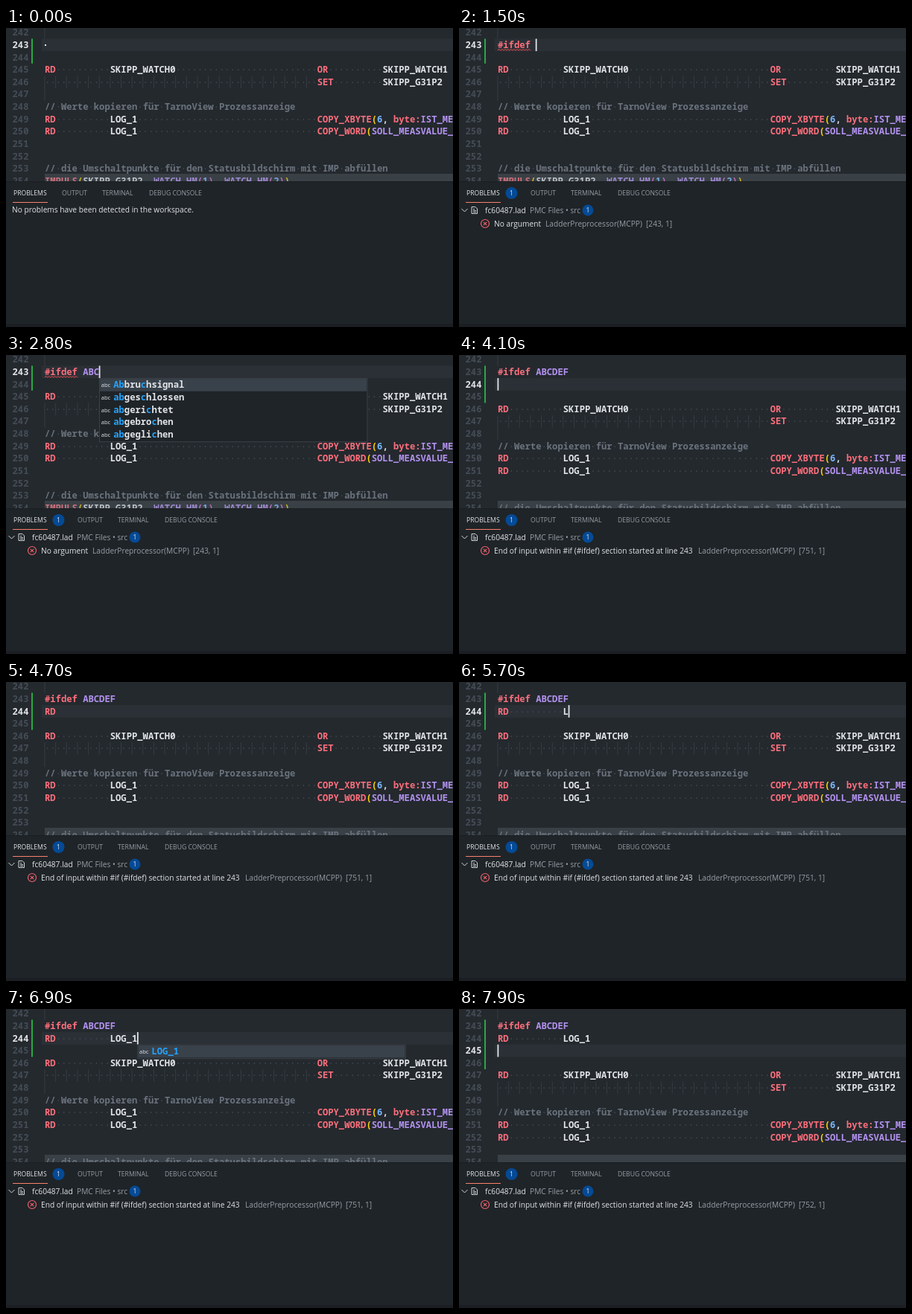
An HTML page that plays this animation: 600x402 px, repeating every 8000 ms.

```html
<!DOCTYPE html>
<html lang="en">
<head>
<meta charset="utf-8">
<style>
  html, body { margin: 0; width: 100%; height: 100%; overflow: hidden; background: #24292e; }
  svg { display: block; width: 600px; height: 402px; }
  text { white-space: pre; }
  .code { font: 600 12.2px "Noto Sans Mono", monospace; font-variant-ligatures: none; }
  .ui { font: 10.2px "Open Sans", sans-serif; fill: #e1e4e8; }
  .tab { font-size: 8.65px; }
  .dim { fill: #959da5; }
  .dot { fill: #444d56; font-weight: 400; }
</style>
</head>
<body>
<svg id="stage" viewBox="0 0 600 402"></svg>
<script>
const LOOP = 8000, COL = 7.32, ROW = 16.65, LEFT = 52, FIRST = 242, PANEL = 206;
const RED = '#fb6f7c', PURPLE = '#b392f0', WHITE = '#e1e4e8', BLUE = '#79b8ff', GREY = '#6a737d';
const svg = document.getElementById('stage');

const at = (col, text, line = '') => line.padEnd(col) + text;
const below = [
  '',
  at(62, 'SKIPP_WATCH1', at(50, 'OR', at(12, 'SKIPP_WATCH0', 'RD'))),
  at(62, 'SKIPP_G31P2', at(50, 'SET')),
  '',
  '// Werte kopieren für TarnoView Prozessanzeige',
  at(50, 'COPY_XBYTE(6, byte:IST_MEASVALUE', at(12, 'LOG_1', 'RD')),
  at(50, 'COPY_WORD(SOLL_MEASVALUE_1', at(12, 'LOG_1', 'RD')),
  '',
  '',
  '// die Umschaltpunkte für den Statusbildschirm mit IMP abfüllen',
  'IMPULS(SKIPP_G31P2, WATCH_HM(1), WATCH_HM(2))'
];

// Key presses as [time, character]
const keys = [
  [300, '#'], [400, 'i'], [500, 'f'], [600, 'd'], [700, 'e'], [800, 'f'], [1100, ' '],
  [2300, 'A'], [2500, 'B'], [2700, 'C'], [3000, 'D'], [3200, 'E'], [3400, 'F'], [3800, '\n'],
  [4150, 'R'], [4200, 'D'], [5200, '\t'],
  [5600, 'L'], [5800, 'O'], [6000, 'G'], [6200, '_'], [6700, '1'], [7500, '\n']
];
const words = ['Abbruchsignal', 'abgeschlossen', 'abgerichtet', 'abgebrochen', 'abgeglichen',
  'LOG_0', 'LOG_1', 'L_MCMD_DOING_AP', 'L_MCMD_DOING_RP'];

const span = (text, fill) => `<tspan fill="${fill}">${text}</tspan>`;
const dots = n => `<tspan class="dot">${'·'.repeat(n)}</tspan>`;
const rect = (x, y, w, h, fill, more = '') =>
  `<rect x="${x}" y="${y}" width="${w}" height="${h}" fill="${fill}" ${more}/>`;
const path = (d, stroke, width = 1) =>
  `<path d="${d}" fill="none" stroke="${stroke}" stroke-width="${width}"/>`;
const code = (x, y, body, more = '') => `<text class="code" x="${x}" y="${y}" ${more}>${body}</text>`;
const label = (x, y, body, cls = '') => `<text class="ui ${cls}" x="${x}" y="${y}">${body}</text>`;
const badge = (x, y, r) => `<circle cx="${x}" cy="${y}" r="${r}" fill="#044a96"/>` +
  `<text class="ui tab" x="${x}" y="${y + 3.2}" text-anchor="middle">1</text>`;
const rowTop = row => row * ROW - 2.2;
const baseline = row => row * ROW + 10.2;

function paint(line) {
  if (line.startsWith('//')) return span(line.replace(/ /g, '\0').replace(/\0/g, dots(1)), GREY);
  let depth = 0;
  return line.replace(/ +|#\w*|[A-Za-z_]\w*:?|\d+|[(),]/g, token => {
    if (token[0] === ' ') return token.length > 1 ? dots(token.length) : token;
    if (token === '(') return span(token, depth++ ? '#da70d6' : '#ffd700');
    if (token === ')') return span(token, --depth ? '#da70d6' : '#ffd700');
    if (/^(#.*|RD?|OR|SET|IMPULS|COPY_\w+|byte:)$/.test(token)) return span(token, RED);
    if (/^(A|IST_|SOLL_|WATCH_)/.test(token)) return span(token, PURPLE);
    return span(token, /^\d/.test(token) ? BLUE : WHITE);
  });
}

function typedLines(t) {
  const lines = [''];
  for (const [time, key] of keys) {
    if (time > t) break;
    const last = lines.length - 1;
    if (key === '\n') lines.push('');
    else lines[last] = key === '\t' ? lines[last].padEnd(12) : lines[last] + key;
  }
  return lines;
}

// Marks the typed letters inside a suggestion, or returns null if they do not fit.
function match(word, typed) {
  let hit = 0;
  const out = [...word].map(ch => {
    const found = hit < typed.length && ch.toLowerCase() === typed[hit].toLowerCase();
    if (found) hit++;
    return span(ch, found ? '#22a4ff' : WHITE);
  }).join('');
  return hit === typed.length ? out : null;
}

function editor(t, typed) {
  const lines = ['', ...typed, ...below], current = typed.length;
  const guide = (col, row, rows) => rect(LEFT - 0.5 + col * COL, rowTop(row), 1, rows * ROW, '#363c43');
  let out = rect(0, 0, 600, 402, '#24292e') + rect(48, rowTop(current), 552, ROW, '#2b3036');
  if (t < 300) out += rect(52, 22, 2, 2, WHITE);
  out += rect(34, rowTop(1), 2, (current + 1) * ROW, '#28a745') + guide(0, 0, 1);
  lines.slice(0, 13).forEach((line, row) => {
    if (line.startsWith('   ')) {
      out += guide(0, row, 2);
      for (let col = 2; col < 50; col += 2) out += guide(col, row, 1);
    }
    out += code(30.5, baseline(row), FIRST + row, `text-anchor="end" fill="${row === current ? WHITE : '#444d56'}"`);
    out += code(LEFT, baseline(row), paint(line));
  });
  if (t >= 900 && t < 3100) {
    let wave = `M${LEFT} 30`;
    for (let i = 1; i <= 22; i++) wave += `L${LEFT + i * 2} ${i % 2 ? 28.4 : 30.4}`;
    out += path(wave, '#f14c4c');
  }
  const pressed = keys.filter(key => key[0] <= t).pop();
  const since = t - (pressed ? pressed[0] : -600);
  if (since % 1000 < 500) {
    out += rect(LEFT + typed[current - 1].length * COL - 0.5, rowTop(current), 1.8, ROW, WHITE);
  }
  return out + rect(LEFT, 196, 548, 10, '#6a737d', 'fill-opacity=".3"');
}

function panel(t) {
  const found = t >= 900, shift = found ? 21 : 0;
  let out = rect(0, PANEL, 600, 196, '#1f2428') + rect(0, PANEL, 600, 1, '#1b1f23') +
    rect(0, 398, 600, 4, '#1b1f23');
  out += label(10, 225.2, 'PROBLEMS', 'tab') + rect(9, 234, 47, 1, '#f9826c');
  [[75, 'OUTPUT'], [129, 'TERMINAL'], [192, 'DEBUG CONSOLE']].forEach(([x, name]) => {
    out += label(x + shift, 225.2, name, 'tab dim');
  });
  if (!found) return out + label(8, 248.3, 'No problems have been detected in the workspace.');

  out += badge(70.5, 222, 8) + badge(173, 245, 7.5);
  out += path('M3.5 243L7.5 247L11.5 243', '#d1d5da');
  out += path('M17 240.5H22L24.5 243V249.5H17ZM19 243.5H21M19 245.5H23M19 247.5H23', '#d1d5da');
  out += label(35, 248.5, 'fc60487.lad') + label(95, 248.5, 'PMC Files • src', 'dim');
  if (t < 1000) return out;

  out += `<circle cx="35" cy="263" r="5.5" fill="none" stroke="#f0626e" stroke-width="1.2"/>` +
    path('M32.8 260.8L37.2 265.2M37.2 260.8L32.8 265.2', '#f0626e', 1.2);
  const open = t >= 3100;
  const message = open ? 'End of input within #if (#ifdef) section started at line 243' : 'No argument';
  const place = open ? `[${749 + typedLines(t - 150).length}, 1]` : '[243, 1]';
  const x = open ? 321 : 116;
  return out + label(47, 266.5, message) + label(x, 266.5, 'LadderPreprocessor(MCPP)', 'dim') +
    label(x + 135, 266.5, place, 'dim');
}

function popup(t, typed) {
  const active = (t >= 2500 && t < 3000) || (t >= 5800 && t < 7000);
  if (!active) return '';
  const line = typed[typed.length - 1], prefix = line.split(' ').pop();
  const rows = words.map(word => match(word, prefix)).filter(Boolean);
  const x = LEFT + line.length * COL, y = rowTop(typed.length + 1);
  let out = rect(x + 0.3, y + 0.3, 359.5, rows.length * ROW + 2, '#1f2428', 'stroke="#3b4148"');
  out += rect(x + 1, y + 1, 358, ROW, '#39414a');
  rows.forEach((body, i) => {
    const base = y + i * ROW + 13.2;
    out += `<text class="ui" x="${x + 2.5}" y="${base - 1}" style="font-size:7.6px">abc</text>`;
    out += code(x + 19, base, body);
  });
  return out;
}

let shown = '';
function frame(now) {
  const t = now % LOOP, typed = typedLines(t);
  const picture = editor(t, typed) + panel(t) + popup(t, typed);
  if (picture !== shown) svg.innerHTML = shown = picture;
  requestAnimationFrame(frame);
}
frame(0);
</script>
</body>
</html>
```
